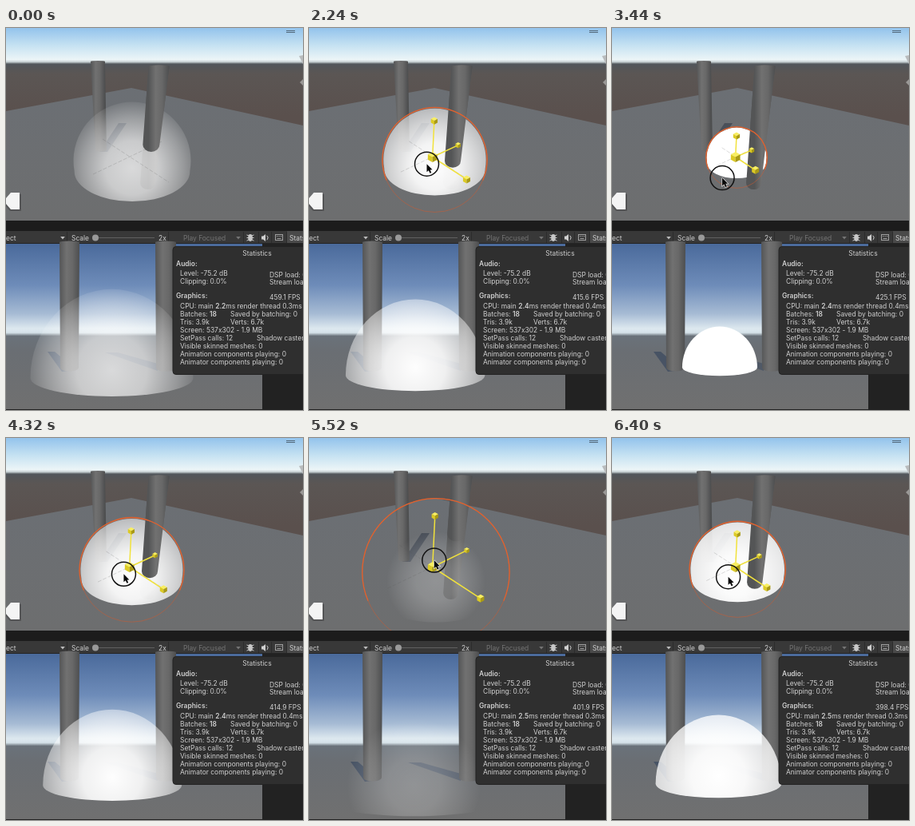
Write an HTML page with a canvas that moves like this. It is 372x478 px and loops after 6480 ms.

```html
<!DOCTYPE html>
<html lang="en">
<head>
<meta charset="utf-8">
<style>
  html, body { margin: 0; width: 100%; height: 100%; overflow: hidden; background: #1c1c1c; }
  canvas { display: block; }
</style>
</head>
<body>
<canvas id="stage" width="372" height="478"></canvas>
<script>
const c = document.getElementById('stage').getContext('2d');
const LOOP = 6480, SELECT = 480, GRAB = 1440, TAU = Math.PI * 2;
const FPS = ['459.1', '410.5', '415.6', '425.1', '414.9', '401.9', '398.4'];

// Smooth step from 0 to 1 between a and b
function ramp(a, b, x) {
  const u = Math.min(1, Math.max(0, (x - a) / (b - a)));
  return u * u * (3 - 2 * u);
}

// Shrink, grow, shrink again
function sphereSize(t) {
  return 1 - .5 * ramp(1720, 3300, t) + .75 * ramp(3300, 5360, t) - .516 * ramp(5360, 6700, t);
}

function rect(x, y, w, h, fill) { c.fillStyle = fill; c.fillRect(x, y, w, h); }

function trace(points) {
  c.beginPath();
  for (let i = 0; i < points.length; i += 2) c.lineTo(points[i], points[i + 1]);
}

function fill(color) { c.fillStyle = color; c.fill(); }

function stroke(color, width) { c.strokeStyle = color; c.lineWidth = width; c.stroke(); }

function poly(color, ...points) { trace(points); fill(color); }

function line(color, width, ...points) { trace(points); stroke(color, width); }

function arc(color, width, x, y, r, from = 0, to = TAU) {
  c.beginPath();
  c.arc(x, y, r, from, to);
  stroke(color, width);
}

function oval(color, x, y, rx, ry) {
  c.beginPath();
  c.ellipse(x, y, rx, ry, 0, 0, TAU);
  fill(color);
}

function linear(x0, y0, x1, y1, ...stops) {
  const g = c.createLinearGradient(x0, y0, x1, y1);
  stops.forEach(([at, color]) => g.addColorStop(at, color));
  return g;
}

// Parts between asterisks are bold
function text(str, x, y, color = '#d0d0d0', align = 'left') {
  c.fillStyle = color;
  c.textAlign = align;
  str.split('*').forEach((part, i) => {
    c.font = (i % 2 ? 600 : 400) + ' 8.45px Inter, sans-serif';
    c.fillText(part, x, y);
    x += c.measureText(part).width;
  });
}

function pillar(x0, y0, w0, x1, y1, w1, round = .4) {
  c.beginPath();
  c.ellipse(x0, y0, w0, w0 * .12, 0, Math.PI, TAU);
  c.ellipse(x1, y1, w1, w1 * round, 0, 0, Math.PI);
  c.closePath();
  fill(linear(x0 - w0, 0, x0 + w0, 0, [0, '#545556'], [.35, '#717171'], [.65, '#686868'], [1, '#4d4e4f']));
}

function frontPillar(end) {
  const k = (end - 48) / 150;
  pillar(191.5, 48, 13, 191.5 - 13.5 * k, end - 9, 13 - 3.5 * k, .85);
}

// Fog is denser and harder at the rim when the sphere is small
function fog(size, x, y, radius, rimPower) {
  const core = 1 - .75 * ramp(.85, 1.23, size);
  const rim = (1 - ramp(.7, 1.05, size)) ** rimPower;
  const g = c.createRadialGradient(x, y, 0, x, y, radius * (1 - .4 * ramp(1, 1.23, size)));
  [[0, 0], [.4, .15], [.75, .62], [1, 1]].forEach(([at, mix]) =>
    g.addColorStop(at, `rgba(255,255,255,${core + (rim - core) * mix})`));
  return g;
}

function cube(x, y, r, [top, left, right]) {
  const w = r * .9, h = r * .5;
  poly(top, x, y - r, x + w, y - h, x, y, x - w, y - h);
  poly(left, x - w, y - h, x, y, x, y + r, x - w, y + h);
  poly(right, x + w, y - h, x, y, x, y + r, x + w, y + h);
}

function handles(size, held) {
  const x = 154.7, y = 161.5;
  const faces = held ? ['#f8ee62', '#dcca24', '#a99a16'] : ['#7c7c7c', '#585858', '#3e3e3e'];
  [[36 * size ** .85, -17 * size, 3.6], [2.5 * size, -52 * size, 4.6], [49 * size, 32 * size, 5]].forEach(([dx, dy, r]) => {
    line(held ? '#f1e23c' : '#bebebe', 1.5, x, y, x + dx, y + dy);
    cube(x + dx, y + dy, r, faces);
  });
  cube(x, y, 6.5, faces);
}

function sceneView(t, size) {
  rect(0, 0, 372, 241, linear(0, 0, 0, 110, [0, '#93c3ec'], [.2, '#c6e2f2'], [.36, '#ecf5f7'],
    [.385, '#c9d3d6'], [.41, '#51565b'], [.52, '#5b5654'], [1, '#5a504d']));
  poly(linear(0, 75, 0, 240, [0, '#6b6f74'], [1, '#6d6e6f']),
    0, 104, 157, 75, 372, 122, 372, 241, 0, 241);
  poly('rgba(56,63,76,.65)', 117, 155, 141, 119, 151, 119, 127, 155);
  pillar(115, 42, 9, 119, 152, 7);
  frontPillar(203);

  // Sphere cut by the ground a little below its centre
  const r = 75 * size, x = 154 + size * 4, y = 158 + size * 8;
  c.beginPath();
  c.arc(x, y, r * .98, Math.PI - .18, TAU + .18);
  c.ellipse(x, y + r * .18, r * .965, r * .5, 0, 0, Math.PI);
  fill(fog(size, x, y + r * .12, r * 1.12, 1));

  c.setLineDash([5, 2]);
  [[46, 22, 40, 19], [34, -22, 49, -32]].forEach(([ax, ay, bx, by]) =>
    line('rgba(90,90,90,.3)', .7, 155 - ax * size, 161 + ay * size, 155 + bx * size, 161 - by * size));
  c.setLineDash([]);
  frontPillar(Math.min(203, 155 * size ** -.9));

  if (t >= SELECT) {
    arc('rgba(205,92,50,.55)', 1, x, y, r);
    arc('#e0622f', 1.3, x, y, r, Math.PI - .4, TAU + .4);
    handles(size, t >= GRAB);
  }

  poly('rgba(40,40,40,.35)', 0, 215, 6, 207, 19, 208, 19, 229, 5, 229, 0, 223);
  poly('#f4f4f4', 0, 213, 6, 206, 17, 206, 17, 227, 6, 227, 0, 220);
  poly('#b9bcbd', 367, 35, 372, 34, 372, 45);
  poly('#9a9896', 368, 68, 372, 64, 372, 72);
  [3.5, 5.5].forEach(row => line('#53687a', 1, 351, row, 362, row));
}

function gameView(size) {
  rect(0, 270, 321, 207, linear(0, 270, 0, 478, [0, '#4a6a9b'], [.25, '#6e8cb9'], [.42, '#a6bbd4'],
    [.51, '#dde8ef'], [.535, '#d5e2e9'], [.555, '#6a727a'], [.65, '#6a6e73'], [1, '#707070']));
  poly('rgba(58,72,94,.7)', 52, 405, 61, 405, 88, 428, 70, 430);
  poly('rgba(58,72,94,.55)', 124, 406, 140, 406, 190, 420, 190, 429);
  pillar(79.5, 268, 12.5, 79.5, 425, 11.5);
  pillar(200, 268, 13, 200, 425, 12);

  const rx = 102 * size ** 1.15, x = 132.5 + (1 - size) * 5, y = 411 + 27 * size;
  c.beginPath();
  c.ellipse(x, y, rx, rx * 1.09, 0, Math.PI, TAU);
  c.ellipse(x, y, rx, rx * .225, 0, 0, Math.PI);
  fill(fog(size, x, y - 10, rx * 1.08, 1.6));
}

function toolbar() {
  rect(0, 241, 372, 13, '#1c1c1c');
  rect(0, 254, 372, 16, '#383838');
  rect(0, 269, 372, 1, '#242424');
  [76, 203, 297, 316, 332, 351].forEach(x => rect(x, 255, 1, 14, '#2b2b2b'));
  text('ect', 0, 265.5);
  text('Scale', 82, 265.5);
  text('2x', 191, 265.5);
  text('Play Focused', 222, 265.5, '#747474');
  [[71, '#bbb'], [291, '#747474']].forEach(([x, color]) => poly(color, x - 2.8, 261, x + 2.8, 261, x, 264.4));
  line('#606060', 1.2, 112, 262.5, 186, 262.5);
  oval('#9a9a9a', 112, 262.5, 4, 4);

  // Bug, speaker and keyboard icons
  [-3, 0, 3].forEach(d => line('#c8c8c8', 1, 301.5, 262.5 + d * 1.2, 306, 262.5 + d * .6, 310.5, 262.5 + d * 1.2));
  oval('#c8c8c8', 306, 262.5, 2.8, 4.4);
  poly('#d0d0d0', 320, 260.5, 322, 260.5, 325, 258, 325, 267, 322, 264.5, 320, 264.5);
  arc('#d0d0d0', 1, 324.5, 262.5, 3.5, -.9, .9);
  c.strokeStyle = '#a0a0a0';
  c.strokeRect(337.5, 258.5, 9, 7);
  [339, 341.5, 344].forEach(x => rect(x, 260, 1.2, 1.2, '#a0a0a0'));
  rect(339.5, 263, 5, 1, '#a0a0a0');
  rect(352, 254, 20, 15, '#4a4a4a');
  text('Stats', 355, 265.5);
}

function statistics(t) {
  const step = Math.floor(t / LOOP * FPS.length);
  const main = step ? (step > 4 ? '2.5' : '2.4') : '2.2';
  const render = step > 1 && step < 5 ? '0.4' : '0.3';
  rect(321, 270, 51, 208, '#222');
  rect(0, 477, 372, 1, '#222');
  c.beginPath();
  c.roundRect(209, 273.5, 180, 160, 4);
  fill('#2f2f2f');
  stroke('#232323', 1);

  text('Statistics', 314.5, 285, '#d0d0d0', 'center');
  text('*Audio:*', 213, 298);
  text('Level: -75.2 dB', 218, 310);
  text('Clipping: 0.0%', 218, 320);
  text('DSP load: 0.2%', 330, 312);
  text('Stream load: 0.0%', 330, 321);
  text('*Graphics:*', 213, 338);
  text(FPS[step] + ' FPS', 330, 340);
  const rows = [`CPU: main *${main}*ms render thread ${render}ms`, 'Batches: *18*', 'Tris: 3.9k',
    'Screen: 537x302 - 1.9 MB', 'SetPass calls: 12', 'Visible skinned meshes: 0',
    'Animation components playing: 0', 'Animator components playing: 0'];
  const rowY = i => 350.5 + i * 10.07;
  rows.forEach((label, i) => text(label, 218, rowY(i)));
  text('Saved by batching: 0', 281, rowY(1));
  text('Verts: 6.7k', 281, rowY(2));
  text('Shadow casters: 0', 314, rowY(4));
}

function cursor(t, size) {
  const held = t >= GRAB, enter = ramp(400, 860, t), reach = ramp(1040, 1420, t);
  const x = held ? 138 + (size - .507) * 26 : -12 + 150 * enter + 13 * reach;
  const y = held ? 187.7 - (size - .507) * 48 : 205 - 16 * enter - 25 * reach;
  if (held) arc('#111', 1.5, x, y, 15);
  c.save();
  c.translate(x, y);
  trace([0, 0, 0, 10, 2.3, 8, 4, 11.6, 5.8, 10.8, 4.2, 7.3, 7, 7.2, 0, 0]);
  stroke('rgba(255,255,255,.8)', 1.4);
  fill('#080808');
  c.restore();
}

function draw(now) {
  const t = now % LOOP, size = sphereSize(t);
  sceneView(t, size);
  cursor(t, size);
  toolbar();
  gameView(size);
  statistics(t);
  requestAnimationFrame(draw);
}
requestAnimationFrame(draw);
</script>
</body>
</html>
```
